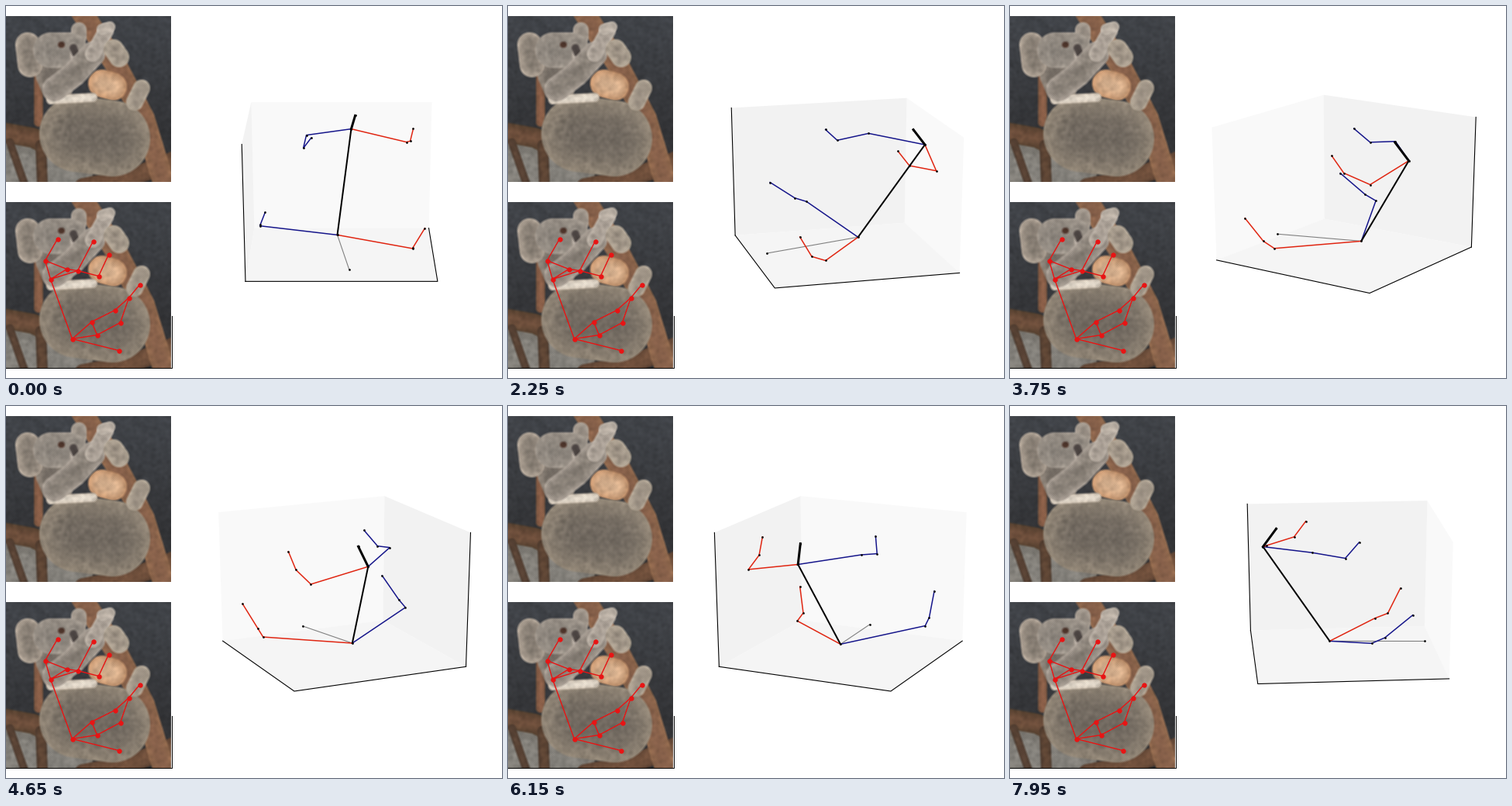
Recreate the animation shown at these times as a matplotlib script. Size 640 px wide and 480 px high, loop 8 s.

```python
import numpy as np
import matplotlib.pyplot as plt
from matplotlib.animation import FuncAnimation
from matplotlib.colors import to_rgb
from matplotlib.patches import Polygon

W, H, DPI = 640, 480, 100
PX = 72 / DPI                     # points per pixel
INTERVAL, FRAMES, HOLD = 50, 160, 3
SIDE, TOP, ROW = 213, 13, 240
RED, BLUE = "#e02410", "#14148a"

fig = plt.figure(figsize=(W / DPI, H / DPI), dpi=DPI, facecolor="white")
ax = fig.add_axes([0, 0, 1, 1])
ax.axis("off")

# ---------- photo, reduced to soft rounded shapes ----------
gy, gx = np.mgrid[TOP:TOP + SIDE + 1, 0:SIDE] + 0.5


def mottle(steps=6):
    a = np.random.default_rng(4).normal(size=gx.shape)
    for _ in range(steps):
        p = np.pad(a, 1, mode="edge")
        a = (p[:-2, 1:-1] + p[2:, 1:-1] + p[1:-1, :-2] + p[1:-1, 2:]) / 4
    return (a / a.std())[..., None]


def distance(points):
    """Distance of every pixel from a polyline."""
    best = np.full(gx.shape, np.inf)
    for (x0, y0), (x1, y1) in zip(points, points[1:]):
        dx, dy = x1 - x0, y1 - y0
        f = np.clip(((gx - x0) * dx + (gy - y0) * dy) / (dx * dx + dy * dy), 0, 1)
        best = np.minimum(best, np.hypot(gx - x0 - f * dx, gy - y0 - f * dy))
    return best


def blend(a, b, f):
    f = f[..., None]
    return np.array(a) * (1 - f) + np.array(b) * f


# centre line, radius, core colour, rim colour
SHAPES = [
    ([(0, 205), (80, 220)], 32, "#85827c", "#77736c"),
    ([(-10, 162), (35, 170), (75, 190)], 13, "#6e4f3c", "#54402f"),
    ([(5, 176), (24, 230)], 5, "#5a4436", "#4c3a2e"),
    ([(45, 180), (47, 230)], 7, "#5f4635", "#4c3a2e"),
    ([(42, 85), (42, 150)], 6, "#8a5f48", "#6e4f3c"),
    ([(100, 234), (160, 222), (215, 200)], 12, "#70503c", "#5d4333"),
    ([(98, 8), (143, 78), (178, 145), (204, 230)], 14, "#86604a", "#8f684c"),
    ([(124, 100), (138, 104)], 18, "#d6b08e", "#c1906a"),
    ([(58, 88), (66, 106)], 20, "#766e66", "#8d8378"),
    ([(92, 165), (137, 171)], 49, "#716960", "#958979"),
    ([(58, 121), (112, 118)], 6, "#e2d8ca", "#c8bbab"),
    ([(28, 50), (31, 76)], 16, "#857c72", "#b3a698"),
    ([(94, 31), (94, 40)], 10, "#938a80", "#aea398"),
    ([(58, 57), (82, 57)], 23, "#8a837b", "#a0978d"),
    ([(90, 63), (95, 67)], 8, "#c9bfb4", "#a89e94"),
    ([(87, 54), (90, 61)], 5, "#4a4341", "#5a524f"),
    ([(71, 50), (72, 50)], 4, "#4d342a", "#5d463c"),
    ([(63, 107), (88, 88), (112, 62)], 16, "#857d74", "#aaa096"),
    ([(112, 62), (129, 32)], 10, "#a79d93", "#bcb2a7"),
    ([(124, 30), (134, 27)], 7, "#b4aa9f", "#c2b8ad"),
    ([(139, 56), (146, 66)], 13, "#9b9083", "#b5a998"),
    ([(166, 124), (175, 106)], 11, "#9b9083", "#b5a998"),
]


def make_photo():
    img = blend(to_rgb("#414449"), to_rgb("#2d2d2f"), (gy - TOP) / SIDE)
    for points, radius, core, rim in SHAPES:
        d = distance(points)
        fill = blend(to_rgb(core), to_rgb(rim), np.clip(d / radius, 0, 1) ** 2)
        img = blend(img, fill, np.clip((radius - d) / 3 + 0.5, 0, 1))
    return np.clip(img * (1 + 0.05 * mottle()), 0, 1)


photo = make_photo()
for y in (TOP, TOP + ROW):
    ax.imshow(photo, extent=(0, SIDE, y + SIDE + 1, y), interpolation="nearest", zorder=0)
ax.plot([0, 213.5, 213.5], [466.5, 466.5, 400], color="black", lw=PX, zorder=1)

# ---------- marked joints on the lower photo ----------
MARKS = dict(nose=(66, 300), head=(50, 328), neck=(57, 352), a1=(78, 339), a2=(92, 341),
             a3=(112, 303), b2=(119, 348), b3=(132, 320), hip=(85, 429), c1=(110, 407),
             c2=(140, 392), c3=(158, 376), c4=(172, 359), d1=(117, 424), d2=(147, 408),
             tail=(145, 444))
LINKS = ["nose head neck hip tail", "head a1 neck a2 a3", "a1 a2 b2 b3",
         "hip c1 c2 c3 c4", "c1 d1", "hip d1 d2 c3"]


def chain(joints, names):
    return np.array([joints[n] for n in names.split()], float)


for link in LINKS:
    ax.plot(*(chain(MARKS, link) + 0.5).T, color="#e81414", lw=1.4 * PX, zorder=2)
ax.plot(*(np.array(list(MARKS.values())) + 0.5).T, "o", color="#e81414",
        ms=6.4 * PX, mew=0, zorder=3)

# ---------- turning 3D view ----------
ELEV, DIST, HALF = np.radians(20), 10, 25 / 48
VIEW_W, VIEW_H = W * 2 / 3, H * 2 / 3
KX, KY = VIEW_W / 1.85, VIEW_H / 1.85
CX, CY = W / 3 + 0.95 * KX + 0.5, H * 5 / 6 - 0.95 * KY + 0.5

JOINTS = dict(
    head=(-.378, .078, .457), neck=(-.454, .056, .327),
    hip=(-.092, -.024, -.406), tail=(.456, .041, -.453),
    lf1=(-.200, -.198, .358), lf2=(-.020, -.212, .314), lf3=(.060, -.167, .419),
    rf1=(-.420, .374, .232), rf2=(-.262, .390, .291), rf3=(-.193, .403, .410),
    lh1=(.102, -.456, -.255), lh2=(.174, -.450, -.216), lh3=(.328, -.415, -.060),
    rh1=(.207, .395, -.394), rh2=(.284, .394, -.354), rh3=(.363, .453, -.170))
BONES = [("hip tail", "#808080", 1.1),
         ("neck lf1 lf2 lf3", BLUE, 1.5), ("hip lh1 lh2 lh3", BLUE, 1.5),
         ("neck rf1 rf2 rf3", RED, 1.5), ("hip rh1 rh2 rh3", RED, 1.5),
         ("neck hip", "black", 2), ("neck head", "black", 3)]


def project(points, azim):
    x, y, z = np.array(points, float).T
    near = x * np.cos(azim) + y * np.sin(azim)
    right = y * np.cos(azim) - x * np.sin(azim)
    depth = near * np.cos(ELEV) + z * np.sin(ELEV)
    up = z * np.cos(ELEV) - near * np.sin(ELEV)
    scale = DIST / (DIST - depth)
    return np.column_stack([CX + KX * right * scale, CY - KY * up * scale])


panes = [ax.add_patch(Polygon(np.zeros((4, 2)), fc=str(grey), ec="none", zorder=4))
         for grey in (0.975, 0.95, 0.9625)]
edge_style = dict(color="black", lw=1.1 * PX, zorder=5)
floor_edge, = ax.plot([], [], **edge_style)
post_edge, = ax.plot([], [], **edge_style)
bones = [ax.plot([], [], color=colour, lw=width * PX, zorder=6)[0]
         for _, colour, width in BONES]
dots, = ax.plot([], [], "o", color="black", ms=2.7 * PX, mew=0, zorder=7)


def update(frame):
    degrees = 5 * (frame // HOLD)
    azim = np.radians(degrees)
    # box sides facing the camera; the nudge settles head-on views
    ahead = np.radians(degrees + 0.01)
    nx, ny = HALF * np.sign([np.cos(ahead), np.sin(ahead)])
    lo, hi = -HALF, HALF
    quads = [
        [(-nx, -ny, lo), (-nx, ny, lo), (-nx, ny, hi), (-nx, -ny, hi)],
        [(-nx, -ny, lo), (nx, -ny, lo), (nx, -ny, hi), (-nx, -ny, hi)],
        [(-nx, -ny, lo), (nx, -ny, lo), (nx, ny, lo), (-nx, ny, lo)]]
    for pane, quad in zip(panes, quads):
        pane.set_xy(project(quad, azim))
    floor_edge.set_data(*project([(-nx, ny, lo), (nx, ny, lo), (nx, -ny, lo)], azim).T)
    post_edge.set_data(*project([(nx, -ny, lo), (nx, -ny, hi)], azim).T)
    for line, (names, _, _) in zip(bones, BONES):
        line.set_data(*project(chain(JOINTS, names), azim).T)
    dots.set_data(*project(list(JOINTS.values()), azim).T)
    return [*panes, floor_edge, post_edge, *bones, dots]


ax.set_aspect("auto")
ax.set_xlim(0, W)
ax.set_ylim(H, 0)
anim = FuncAnimation(fig, update, frames=FRAMES, interval=INTERVAL, repeat=True, repeat_delay=0)
plt.show()
```
